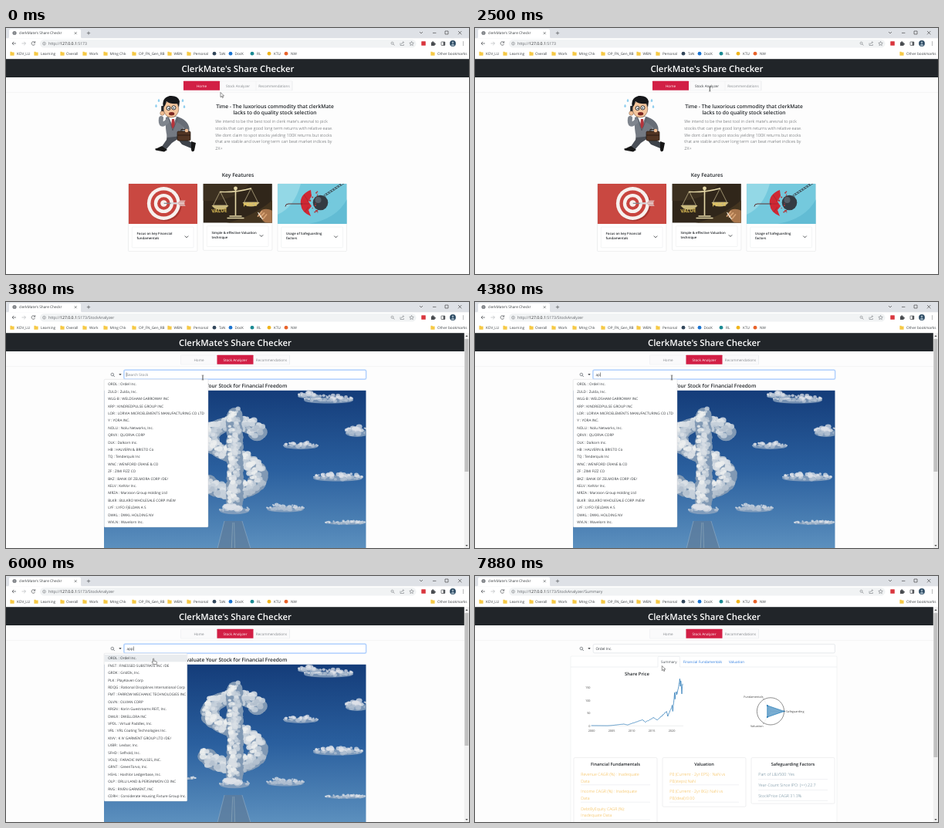
Animation of 600 by 319 pixels, one loop 8000 ms. Source, as an HTML page:

```html
<!DOCTYPE html>
<html lang="en">
<head>
<meta charset="utf-8">
<title>Share Checker</title>
<style>
html, body { margin: 0; width: 100%; height: 100%; overflow: hidden; background: #fff; }
svg { display: block; }
#stage { width: 100vw; height: 100vh; }
text { font-family: "Open Sans", "Noto Sans", sans-serif; text-rendering: geometricPrecision; white-space: pre; }
</style>
</head>
<body>
<svg id="stage" viewBox="0 0 600 319" xmlns="http://www.w3.org/2000/svg"></svg>
<script>
const LOOP = 8000, STEP = 125;
const stage = document.getElementById('stage');
const RED = '#d21f45', INK = '#212529', EDGE = '#dee2e6';

let seed = 7;
const rnd = () => (seed = (seed * 16807) % 2147483647) / 2147483647;
const esc = s => s.replace(/&/g, '&amp;').replace(/</g, '&lt;').replace(/>/g, '&gt;');

const text = (x, y, s, size, fill = INK, weight = 400, anchor = 'start') =>
  `<text x="${x}" y="${y}" font-size="${size}" fill="${fill}" font-weight="${weight}" text-anchor="${anchor}">${esc(s)}</text>`;
const mid = (x, y, s, size, fill, weight) => text(x, y, s, size, fill, weight, 'middle');
const rect = (x, y, w, h, fill, r = 0, stroke = 'none', sw = .4) =>
  `<rect x="${x}" y="${y}" width="${w}" height="${h}" rx="${r}" fill="${fill}" stroke="${stroke}" stroke-width="${sw}"/>`;
const circle = (x, y, r, fill, stroke = 'none', sw = .5) =>
  `<circle cx="${x}" cy="${y}" r="${r}" fill="${fill}" stroke="${stroke}" stroke-width="${sw}"/>`;
const shape = (d, fill) => `<path d="${d}" fill="${fill}"/>`;
const line = (d, stroke, sw = .6, more = '') =>
  `<path d="${d}" fill="none" stroke="${stroke}" stroke-width="${sw}" ${more}/>`;
const group = (id, body) => `<g id="${id}">${body}</g>`;
const ROUND = 'stroke-linecap="round" stroke-linejoin="round"';

function chrome() {
  const folder = x => shape(`M${x - 2.6} 30.8h2l.6.7h2.6v4.2h-5.2z`, '#f6c945');
  const marks = [
    [8, 14, 'KOV_LU'], [39, 45, 'Learning'], [73, 78, 'Overall'], [102, 108, 'Work'], [129, 134.5, 'Mtng Chk'],
    [166, 172, 'OP_FN_Gen_RB'], [212, 217.5, 'WBN'], [237, 243, 'Personal'],
    [270, 276, 'TaN', '#33475b'], [291, 296.5, 'DocK', '#1b74d0'], [319, 325, 'RL', '#1b8a92'],
    [341, 347, 'KTU', '#f0b51c'], [363, 369, 'NW', '#e8632b'], [553, 559, 'Other bookmarks']
  ];
  return rect(0, 0, 600, 13.5, '#dee1e6') +
    shape('M2 13.5q2 0 2-2V3.5q0-2 2-2H95q2 0 2 2v8q0 2 2 2z', '#fff') +
    circle(11, 6.5, 2.5, '#5f6368') + line('M9 5.5h4M9 7.5h4M11 4.2v4.6', '#fff', .35) +
    text(17, 8.2, 'clerkMate\'s Share Checkr', 4.75, '#3c4043') +
    line('M88.7 5.2l3 3m0-3l-3 3M104.8 6.6h4.4M107 4.4v4.4', '#45484c', .6) +
    line('M536 5l2 2 2-2M553 6.4h4.4M569 4h4v4h-4zM586 4l4.4 4.4m0-4.4l-4.4 4.4', '#333', .6) +
    rect(0, 13.5, 600, 26.7, '#fff') +
    line('M13 20H8m2.2-2.2L8 20l2.2 2.2', '#4a4d51', .7) +
    line('M20.5 20h5m-2.2-2.2l2.2 2.2-2.2 2.2', '#b5b8bb', .7) +
    line('M37.4 18.8a2.3 2.3 0 1 0 .2 1.9M37.7 17.2v1.9h-2', '#4a4d51', .7) +
    rect(44, 15, 487.5, 10.4, '#f1f3f4', 5.2) +
    circle(49.5, 20.2, 1.9, 'none', '#5f6368', .5) + line('M49.5 19.9v1.3M49.5 18.9v.4', '#5f6368', .5) +
    `<text x="55" y="22" font-size="5.15" fill="#5f6368">http://<tspan fill="#202124">127.0.0.1</tspan>:5173<tspan id="path"></tspan></text>` +
    circle(500.6, 19.7, 1.5, 'none', '#5f6368') + line('M501.7 20.8l1.7 1.7', '#5f6368', .6) +
    line('M511 19.5v3h4.4v-1.4M512.4 21q.5-2.4 3-2.4m-1.1-1.2l1.3 1.2-1.3 1.3', '#5f6368', .5) +
    line('M525.6 17.4l.8 1.8 2 .2-1.5 1.3.4 1.9-1.7-1-1.7 1 .4-1.9-1.5-1.3 2-.2z', '#5f6368', .5) +
    rect(538.3, 17.3, 5.5, 5.5, '#d9363e', .5) +
    shape('M551 18.6h1.3q-.2-1.4.9-1.4t.9 1.4h1.4v1.3q1.4-.2 1.4.9t-1.4.9v1.4H551z', '#4a4d51') +
    rect(564, 18, 4.8, 4.5, 'none', .4, '#4a4d51', .7) + rect(566.7, 18, 2.1, 4.5, '#4a4d51') +
    circle(579, 20, 3.9, '#2c4a63') + circle(579, 18.8, 1.3, '#9cb0bf') + shape('M576.6 22.6q2.4-4 4.8 0-2.4 1.6-4.8 0z', '#9cb0bf') +
    [18, 20, 22].map(y => circle(592.5, y, .5, '#4a4d51')).join('') +
    marks.map(([ix, tx, s, c]) => (c ? circle(ix, 33.2, 2.4, c) : folder(ix)) + text(tx, 35, s, 4.7, '#3c4043')).join('');
}

// Dark title bar and page tabs; cx is the centre of the page.
function nav(cx, active) {
  const tabs = ['Home', 'Stock Analyzer', 'Recommendations'];
  return rect(0, 40, 600, 24, INK) +
    mid(cx, 56.5, 'ClerkMate\'s Share Checker', 11.4, '#fff', 600) +
    rect(cx - 70.5, 68.8, 141, 12.2, '#fafafb', .6, '#e6e8ea') +
    tabs.map((s, i) => {
      const x = cx + (i - 1) * 47, on = i === active;
      return (on ? rect(x - 23.5, 68.8, 47, 12, RED, .5) : line(`M${x + 23.5} 69v11.8`, '#e3e5e8', .4)) +
        `<g ${i === 1 && !on ? 'id="hover"' : ''}>${mid(x, 76.5, s, 4.6, on ? '#fff' : '#85898d')}</g>`;
    }).join('') +
    line('M0 83.6H600', '#ececee', .5);
}

function clerk() {
  return shape('M209 137l12 0 3 6-9 6-8 9-6-3 7-10z', '#4b5058') +
    shape('M217 137l10-1 9 10 7 4-3 6-12-5z', '#3e434a') +
    shape('M202 153l7 5-4 2.6-11-2.2q-2-2.4 1.6-2.4z', '#171717') +
    shape('M240 147l6 2-2 10q-3 3-4-1z', '#171717') +
    shape('M207 116q9-5 17 0 9 10 5 24l-20 2q-3-12-2-26z', '#747a83') +
    line('M223 119Q235 124 234 133', '#676d76', 7, ROUND) +
    line('M209 121Q199 130 201 117', '#7f858e', 6, ROUND) +
    shape('M211 116l5 11 5-12z', '#fff') + shape('M215 118l3 0 1 9-3 4-2-4z', '#b5343b') +
    line('M211 117l5 16 7-17', '#555b64', .9) +
    rect(222, 134, 17, 12, '#513524', 1.4, '#241710', .7) + line('M227 134v-2.5h6v2.5M222 139h17', '#241710', .9) +
    circle(234, 133, 2.3, '#f0bd93') +
    `<ellipse cx="214" cy="105" rx="9.8" ry="11" fill="#f4c59c" stroke="#5a3a25" stroke-width=".5"/>` +
    shape('M204 103q-3-12 8-15 11-1 13 7l-1 8-2-5q-9 1-14-3-1 5-4 8z', '#16171a') +
    circle(210.6, 104, 2.6, '#e9edf0', '#222', .9) + circle(217.4, 103.4, 2.6, '#e9edf0', '#222', .9) +
    circle(211.2, 104.4, .8, '#111') + circle(217.2, 103.8, .8, '#111') +
    `<ellipse cx="214.6" cy="111.3" rx="3.6" ry="2.2" fill="#7c2723"/>` +
    rect(201.2, 101, 3, 11, '#24272c', .8) + circle(202.5, 110.5, 2.8, '#f0bd93', '#5a3a25', .4) +
    [[194.5, 101], [198, 94], [229, 94], [231, 102]].map(([x, y]) =>
      shape(`M${x} ${y - 2.2}q2.6 3.6 0 4.2-2.6-.6 0-4.2z`, '#8ecdee')).join('');
}

const picture = (x, w, h, body) =>
  `<svg x="${x}" y="202" width="${w}" height="${h}" viewBox="0 0 ${w} ${h}" overflow="hidden">${body}</svg>`;

function target() {
  const rings = [[21.5, '#f7f1ee'], [17, '#c8443e'], [12.6, '#f7f1ee'], [8.3, '#c8443e'], [4.2, '#f7f1ee']];
  return picture(158.7, 89.3, 52, rect(0, 0, 90, 52, '#c94841') + circle(47.5, 27, 21.5, '#a9352f') +
    rings.map(([r, c]) => circle(45.7, 25.5, r, c)).join('') +
    line('M46 25.4H62', '#82878d', 1.2) + line('M55 25.4H67', '#d8dadd', 2.4) +
    shape('M64 25l3-3.6h7l-2 3.8 2 3.8h-7z', '#d9a5a2') + line('M65 25.2h8', '#f5e6e4', .8));
}

function scales() {
  const gold = '#e6d9a8';
  const pan = (x, y) => line(`M${x} ${y - 18}l-9 18h18z`, gold, .6) + shape(`M${x - 11} ${y}h22q-3 5.5-11 5.5t-11-5.5z`, '#c9b87c');
  return picture(255.5, 89.3, 50.5, rect(0, 0, 90, 51, '#30261a') +
    shape('M0 0h60q-20 24-60 22z', '#3c3020') + shape('M90 51h-60q34-8 60-30z', '#43341f') +
    pan(22, 28) + pan(62, 24) +
    line('M22 10.5q20 1 40-4.5', gold, 1.4, ROUND) + line('M42 5v36M34 42h16M31 44.5h22', gold, 1.6) + circle(42, 6, 2.4, gold) +
    `<g transform="rotate(-3 22 36)">${mid(21, 37, 'VALUE', 6.4, '#e6c65a', 700)}</g>` +
    `<g transform="rotate(-3 62 29)">${mid(61, 29, 'PRICE', 6.4, '#e6c65a', 700)}</g>` +
    shape('M90 51V35q-8-4-14-1l-5 6 4 4q3 7 9 7z', '#a9764c') + line('M76 36l-5 6M79 38l-5 5M82 40l-4 5', '#d7a273', 1.8, ROUND) +
    line('M71 37l6 9', '#f3f0e4', 1.1));
}

function wrecker() {
  seed = 41;
  let chain = '', bits = '';
  for (let i = 0; i < 9; i++) chain += `<ellipse cx="${62 + i * 3}" cy="${14.5 - i * 2}" rx="2" ry="1.2" transform="rotate(-34 ${62 + i * 3} ${14.5 - i * 2})" fill="none" stroke="#3c4750" stroke-width=".9"/>`;
  for (let i = 0; i < 16; i++) bits += circle(42 + rnd() * 10, 10 + rnd() * 30, .4 + rnd() * .8, '#b0383c');
  return picture(352, 89.5, 52, rect(0, 0, 90, 52, '#74c9dd') + shape('M0 0h30q-8 30-30 40z', '#93d8e6') + shape('M90 52H40q36-6 50-32z', '#62bcd4') +
    chain + circle(55.5, 24.5, 9.8, '#343b42') + circle(52.5, 21, 4, '#566069') +
    shape('M43 8q-15 6-13 19 1 10 13 15l-3-8 4-5-4-6 4-7z', '#cf2834') + line('M31 26h10M34 14l6 9M35 37l5-7', '#97202b', .6) +
    line('M32 26H14q-4 0-4 3.6', '#5d3030', 1) + bits);
}

function home() {
  const para = ['We intend to be the best tool in clerk mate\'s aresnal to pick',
    'stocks that can give good long term returns with relative ease.',
    'We dont claim to spot stocks yielding 100X returns but stocks',
    'that are stable and over long term can beat market indices by', '2X+'];
  const card = (x, dy, art, l1, l2) => rect(x, 202, 89.4, 87.6 - dy, '#fff', 1.2, '#d5d7da') + art() +
    rect(x + 4.8, 258 - dy, 79.8, 26.8, '#fff', 1, '#e1e3e6') +
    text(x + 11, 268.4 - dy, l1, 4.3, INK, 600) + text(x + 11, 274.4 - dy, l2, 4.3, INK, 600) +
    line(`M${x + 73.3} ${269.6 - dy}l2.2 2.2 2.2-2.2`, INK, .8);
  return nav(300.5, 0) + clerk() +
    mid(348.5, 103.6, 'Time - The luxorious commodity that clerkMate', 6.7, INK, 600) +
    mid(348.5, 112.4, 'lacks to do quality stock selection', 6.7, INK, 600) +
    para.map((s, i) => text(271.3, 123 + i * 8.8, s, 5.5, '#44484c', 300)).join('') +
    mid(300.5, 193.3, 'Key Features', 6.7, INK, 600) +
    card(158.5, 0, target, 'Focus on key Financial', 'fundamentals') +
    card(255.5, 1.3, scales, 'Simple & effective Valuation', 'technique') +
    card(352, 0, wrecker, 'Usage of Safeguarding', 'factors');
}

const disc = (x, y, r, fill, alpha = 1) =>
  `<ellipse cx="${x.toFixed(1)}" cy="${y.toFixed(1)}" rx="${(r * 1.2).toFixed(1)}" ry="${r.toFixed(1)}" fill="${fill}" opacity="${alpha}"/>`;

// Flat-bottomed cloud: grey base, lighter heaps above it.
function puff(cx, cy, rx, ry) {
  let out = `<ellipse cx="${cx}" cy="${cy + ry * .2}" rx="${rx}" ry="${ry * .5}" fill="#8fa6c0" opacity=".8"/>`;
  for (let i = 0; i < rx * 2; i++) {
    const u = rnd() * 2 - 1, h = ry * Math.sqrt(1 - u * u), v = rnd();
    out += disc(cx + u * rx, cy + h * (.35 - v), .8 + h * .3 * rnd(), v > .4 ? '#dde2e8' : '#b0bfd0', .75);
  }
  return out;
}

function cloudStroke(d, w) {
  const p = document.createElementNS('http://www.w3.org/2000/svg', 'path');
  p.setAttribute('d', d);
  const tones = ['#eceeef', '#d9dfe5', '#c6d0da', '#b3c0ce'];
  let back = '', front = '';
  for (let s = 0, n = p.getTotalLength(); s < n; s += 1.4) {
    const { x, y } = p.getPointAtLength(s);
    back += disc(x + 1 + (rnd() - .5) * w * .3, y + 1.5, w * .42, '#8199b4');
    for (let j = 0; j < 2; j++) {
      const u = rnd() - .5, v = rnd() - .5;
      const tone = Math.min(3, Math.max(0, Math.floor((u + v + .9) * 2.2)));
      front += disc(x + u * w * .75, y + v * w * .75, w * (.08 + rnd() * .1), tones[tone], .85);
    }
  }
  return back + front;
}

function sky() {
  seed = 99;
  const clouds = [[184, 121, 46, 9], [152, 137, 20, 5], [206, 137, 18, 4], [208, 161, 12, 4], [418, 126, 32, 8], [393, 121, 15, 6],
    [455, 168, 15, 10], [382, 186, 22, 7], [184, 197, 12, 3], [166, 229, 30, 9], [430, 227, 32, 8], [362, 267, 24, 8],
    [232, 262, 14, 3], [146, 262, 18, 4], [440, 286, 26, 4], [200, 290, 26, 3]];
  return `<svg x="127" y="114.7" width="339.5" height="205" viewBox="127 114.7 339.5 205" overflow="hidden">` +
    rect(127, 114, 340, 206, 'url(#air)') + `<g filter="url(#soft)">` +
    clouds.map(c => puff(...c)).join('') +
    cloudStroke('M326 170C318 150 264 152 263 175C263 200 326 196 326 226C324 250 266 252 260 230', 21) +
    cloudStroke('M295.5 143V262', 18) + puff(296, 269, 19, 9) + '</g>' +
    `<g opacity=".75">${shape('M283 284h23l11 36h-43z', '#5f7d9b')}${line('M283 284l-9 36M306 284l11 36', '#a9bccd', .6)}` +
    line('M293.8 286l-1.6 34M295.6 286l1 34', '#b9c4c4', .5) + '</g></svg>';
}

const field = () =>
  circle(137.8, 94, 1.8, 'none', '#495057', .6) + line('M139.1 95.3l1.7 1.7', '#495057', .7) +
  shape('M146.3 93.2h3.4l-1.7 1.9z', INK) + rect(153.2, 88.4, 313.2, 11.4, '#fff', 1.6, '#ced4da', .5) +
  group('focus', rect(152.7, 87.9, 314.2, 12.4, '#fff', 2, '#c3dcfd', 1.3) + rect(153.2, 88.4, 313.2, 11.4, '#fff', 1.6, '#86b7fe', .6)) +
  '<text id="query" x="156.4" y="95.8" font-size="4.7"></text>' +
  `<rect id="caret" y="91.4" width=".5" height="5.4" fill="${INK}"/>`;

const popular = ['ORDL : Ordel Inc.', 'ZULD : Zulda, Inc.', 'WLG-B : WELDSHAM GARROWAY INC', 'KRP : KINDREDPULSE GROUP INC',
  'LOR : LORVIA MICROELEMENTS MANUFACTURING CO LTD', 'Y : YORA INC.', 'NOLU : Nolu Networks, Inc.', 'QRVX : QUORVA CORP',
  'DLK : Dalkorn Inc.', 'HB : HALVERN & BRISTO Co', 'TQ : Tenderquik Inc', 'WNC : WENFORD CRANE & CO', 'ZF : ZIMI FIZZ CO',
  'BKZ : BANK OF ZELMORA CORP /DE/', 'KELV : KelVor Inc.', 'MRZA : Marzoon Group Holding Ltd', 'BLKR : BULKRO WHOLESALE CORP /NEW',
  'LYF : LYFO FJELDAN A S', 'DWKL : DWKL HOLDING NV', 'WVLN : Wavelorn Inc.'];
const matches = ['ORDL : Ordel Inc.', 'FNST : FINESSED SUBSTRATE INC /DE', 'GRDK : GridOk, Inc.', 'PLK : PlayKoven Corp',
  'RDQG : Rational Disciplines International Corp', 'FMT : FARROW MECHANIC TECHNOLOGIES INC', 'OLVN : OLVIAN CORP',
  'KRGN : Korin Guestrooms REIT, Inc.', 'DWLR : DWELLORA INC', 'VPDL : Virtual Paddles, Inc.', 'VRL : VRL Coating Technologies Inc.',
  'KIVV : K IV GARMENT GROUP LTD /DE/', 'LXBR : Lexbar, Inc.', 'SFHD : Sefhold, Inc.', 'VOLQ : FARADIC IMPULSES, INC.',
  'GRNT : GreenTorvo, Inc.', 'HSHL : Hashlor Ledgerbase, Inc.', 'OLP : ORLU LAND & PERSIMMON CO INC', 'RVG : RIVEN GARMENT, INC',
  'CDRH : Considerate Housing Fixture Group Inc.'];

const list = (items, w, extra = '') => rect(127.2, 100.3, w, 191.7, '#fff', 1.2, '#c9ccd0') + extra +
  items.map((s, i) => text(132.2, 108.3 + i * 9.4, s, 4.65, '#33373b')).join('');

function chart() {
  const px = y => 151 + (y - 2000) * 5.2, py = v => 194.3 - v * .328;
  const keys = [[2000, 1], [2004, .5], [2005, 1.5], [2008, 7], [2009, 3.5], [2012.7, 24], [2013.4, 14.5], [2015.4, 32], [2016.4, 23],
    [2018.7, 56], [2019, 37], [2020.1, 80], [2020.25, 58], [2020.7, 132], [2020.8, 110], [2021.1, 136], [2021.25, 119],
    [2021.7, 150], [2022, 181], [2022.15, 158], [2022.25, 176], [2022.5, 131], [2022.7, 165]];
  seed = 23;
  let d = '';
  for (let i = 1; i < keys.length; i++) {
    const [x0, v0] = keys[i - 1], [x1, v1] = keys[i], n = Math.ceil((x1 - x0) / .12);
    for (let j = 0; j < n; j++) {
      const u = j / n, v = v0 + (v1 - v0) * u;
      d += `${d ? 'L' : 'M'}${px(x0 + (x1 - x0) * u).toFixed(2)} ${py(v * (1 + (rnd() - .5) * .09)).toFixed(2)}`;
    }
  }
  d += `L${px(2022.7)} ${py(165)}`;
  return mid(210, 129.4, 'Share Price', 5.9, INK, 600) +
    line('M151 194.4H270', '#d5d8db', .4) + line(d, '#3580bb', .8, ROUND) +
    [0, 50, 100, 150].map(v => text(149.5, py(v) + 1.3, String(v), 3.8, '#444', 400, 'end')).join('') +
    [2000, 2005, 2010, 2015, 2020].map(y => mid(px(y), 201.8, String(y), 3.8, '#444')).join('');
}

const radar = () => circle(383, 175.4, 17.6, '#fff', '#444', .6) +
  line('M383 175.4H400.6M383 175.4l-8.8-15.2M383 175.4l-8.8 15.2', '#ddd', .4) +
  `<path d="M378.8 168L400.6 175.4 378.8 183z" fill="#1f77b4" fill-opacity=".6" stroke="#1f77b4" stroke-width=".7"/>` +
  [[378.8, 168], [400.6, 175.4], [378.8, 183]].map(([x, y]) => circle(x, y, .9, '#1f77b4')).join('') +
  line('M374.2 160.2l-.9-1.5M374.2 190.6l-.9 1.5M400.6 175.4h1.8', '#444', .5) +
  text(373.5, 158, 'Fundamentals', 3.8, '#444', 400, 'end') + text(403.2, 176.8, 'Safeguarding', 3.8, '#444') +
  text(373.5, 196.4, 'Valuation', 3.8, '#444', 400, 'end');

function summary() {
  const amber = '#f2b033', slate = '#56798c', blue = '#2f7de0';
  const card = (x, h, title, color, rows, rules) => rect(x, 235.6, 108, h, '#fff', 1.4, '#d5d7da') +
    mid(x + 54, 246, title, 5.6, INK, 600) +
    rows.map(([y, s]) => text(x + 9.3, y + 2.1, s, 5.35, color, 300)).join('') +
    rules.map(y => line(`M${x + 9} ${y}h90`, '#dcdfe2', .4)).join('');
  return rect(124, 104, 345, 230, '#fff', 1, EDGE) + line('M124 118H237M265.5 118H469', EDGE, .5) +
    line('M237 118v-12.5q0-1.2 1.2-1.2h26q1.3 0 1.3 1.2V118', EDGE, .5) +
    mid(251.2, 112.6, 'Summary', 4.6, '#495057') + mid(295, 112.6, 'Financial Fundamentals', 4.6, blue) +
    mid(339, 112.6, 'Valuation', 4.6, blue) + chart() + radar() +
    card(128, 100, 'Financial Fundamentals', amber, [[257, 'Revenue CAGR (%) : Inadequate'], [265.7, 'Data'],
      [279.3, 'Income CAGR (%) : Inadequate'], [288, 'Data'], [301.6, 'DebtByEquity CAGR (%):'], [310.3, 'Inadequate Data']], [270.8, 293.3, 316]) +
    card(243, 63.6, 'Valuation', amber, [[257, 'PE:(Current - 2yr EPS) : NaN vs'], [265.7, 'PE(steps):NaN'],
      [279.3, 'PE:(Current - 2yr BG): NaN vs'], [288, 'PE(Ideal):0.00']], [270.8, 293.3]) +
    card(358, 59.5, 'Safeguarding Factors', slate, [[257, 'Part of L&V500: Yes'], [271, 'Year-Count Since IPO: (>=) 22.7'],
      [285, 'StockPrice CAGR 31.3%']], [263.7, 277.6, 291.4]);
}

const scrollbar = () => rect(593.8, 40, 6.2, 279, '#f1f1f1') +
  shape('M595.4 45l1.6-2 1.6 2z', '#505050') + shape('M595.4 315l1.6 2 1.6-2z', '#505050') +
  '<rect id="thumb" x="594.4" y="48" width="5" fill="#c1c1c1"/>';

const pointers =
  group('arrow', '<path d="M0 0V6.2L1.5 4.9 2.5 7.1 3.5 6.6 2.5 4.5H4.5Z" fill="#fff" stroke="#222" stroke-width=".5"/>') +
  group('beam', line('M-1.3-3h.9q.4 0 .4.5V2.5q0 .5.4.5h.9M1.3-3H.4Q0-3 0-2.5V2.5q0 .5-.4.5h-.9', '#333', .5)) +
  group('hand', '<path d="M0 0q.9-.7 1.4.2V3l3 .7q.7.3.6 1.2L4.6 7.3H1L-1.6 4.4q.3-1 1.6 0z" fill="#fff" stroke="#222" stroke-width=".5" stroke-linejoin="round"/>');

stage.innerHTML = `<defs>
  <linearGradient id="air" x1="0" y1="0" x2="0" y2="1"><stop offset="0" stop-color="#143c79"/><stop offset=".5" stop-color="#2a5f9e"/><stop offset="1" stop-color="#5c90be"/></linearGradient>
  <filter id="soft"><feGaussianBlur stdDeviation=".7"/></filter></defs>` +
  rect(0, 0, 600, 319, '#fdfdfd') + group('home', home()) +
  group('inner', nav(297, 1) +
    group('search', mid(297, 110.7, 'Evaluate Your Stock for Financial Freedom', 6.65, INK, 600) + sky()) +
    group('summary', summary()) + field() +
    group('empty', rect(127.2, 100.3, 46.5, 14.6, '#fff', 1.2, '#dcdfe2') + text(132, 108.8, ',', 4.6, '#6c757d')) +
    group('listA', list(popular, 134.8)) +
    group('listB', list(matches, 107.6, rect(127.6, 102, 106.8, 9.3, '#e9ecef'))) + scrollbar()) +
  chrome() + group('cursor', pointers);

const el = id => document.getElementById(id);
const show = (id, on) => el(id).setAttribute('display', on ? 'inline' : 'none');

// Steps at which things happen
const HOVER = 11, OPEN = 22, CLICK = 26, LISTED = 30, FOUND = 44, PICK = 51, DONE = 53;
const keystrokes = [32, 34, 36];

// Pointer way points: step, x, y
const track = [[0, 278, 83.5], [3, 281, 83], [4, 281, 83], [7, 286, 82], [9, 286, 82], [10, 303.5, 73.5], [13, 303.5, 73.5],
  [17, 304.3, 79], [23, 304.3, 79], [26, 255, 98], [44, 255, 98], [48, 190.5, 107.3], [53, 190.5, 107.3], [60, 242.3, 116.5], [64, 242.3, 116.5]];

function place(k) {
  const i = track.findIndex(p => p[0] > k), [k0, x0, y0] = track[i - 1], [k1, x1, y1] = track[i];
  const u = (k - k0) / (k1 - k0), e = u * u * (3 - 2 * u);
  return [x0 + (x1 - x0) * e, y0 + (y1 - y0) * e];
}

function draw(t) {
  const k = Math.floor(t / STEP);
  const inner = k >= OPEN, done = k >= DONE, picked = k >= PICK;
  show('home', !inner);
  show('inner', inner);
  show('search', !done);
  show('summary', done);
  show('empty', k >= CLICK && k < LISTED);
  show('listA', k >= LISTED && k < FOUND);
  show('listB', k >= FOUND && !picked);
  show('focus', k > CLICK && !picked);
  el('hover').firstChild.setAttribute('fill', k >= HOVER ? '#33373b' : '#85898d');
  el('path').textContent = !inner ? '' : done ? '/StockAnalyzer/Summary' : '/StockAnalyzer';
  el('thumb').setAttribute('height', done ? 187 : 172);

  const pressed = keystrokes.filter(s => s <= k);
  const typed = picked ? 'Ordel Inc.' : 'app'.slice(0, pressed.length);
  const query = el('query');
  query.textContent = typed || 'Search Stock';
  query.setAttribute('fill', typed ? '#343a40' : '#7b8289');

  // The caret blinks from the latest click or key press.
  const since = k - (pressed.length ? pressed[pressed.length - 1] : CLICK);
  el('caret').setAttribute('x', typed && inner ? 156.6 + query.getComputedTextLength() : 155.8);
  show('caret', k >= CLICK && !picked && since % 4 < 2);

  const kind = k >= 46 && k < 55 ? 'hand' : k >= 14 && k < OPEN || k >= 25 && k < 46 ? 'beam' : 'arrow';
  for (const id of ['arrow', 'beam', 'hand']) show(id, id === kind);
  el('cursor').setAttribute('transform', `translate(${place(k).join(' ')})`);
}

function tick() {
  draw(performance.now() % LOOP);
  requestAnimationFrame(tick);
}
tick();
</script>
</body>
</html>
```
